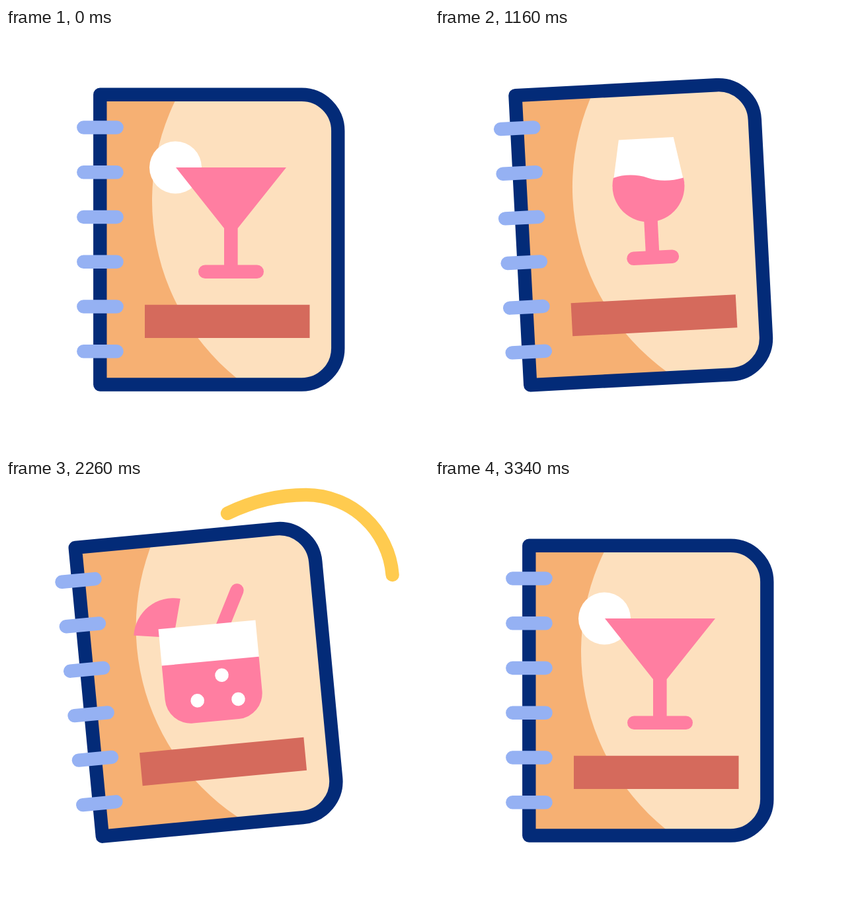
Recreate the animation shown at these times as an HTML page. Size 640 px wide and 640 px high, loop 3580 ms.

```html
<!DOCTYPE html>
<html lang="en">
<head>
<meta charset="utf-8">
<title>Drinks menu</title>
<style>
  html, body { margin: 0; width: 100%; height: 100%; overflow: hidden; background: #fff; }
  svg { display: block; width: 100vw; height: 100vh; }
  .pink { fill: #ff7ea1; }
  .white { fill: #fff; }
  .line { fill: none; stroke-width: 20.4; stroke-linecap: round; stroke-linejoin: round; }
  .arc { stroke: #ffcb4f; }
</style>
</head>
<body>
<svg viewBox="0 0 640 640">
  <defs>
    <path id="cover" d="M142.3 100.8H447A55 55 0 0 1 502.3 156V484A55 55 0 0 1 447 539.5H142.3Z"/>
    <clipPath id="inside"><use href="#cover"/></clipPath>
    <clipPath id="aboveBar"><rect width="640" height="444"/></clipPath>
  </defs>

  <path class="line arc" pathLength="1" d="M345 63.5C380 46 412 37 447 37C525 37 588 100 588 178Q588 189 587 200"/>
  <path class="line arc" pathLength="1" d="M583 182Q585 168 585 155C585 83 526 24 454 24C408 24 370 35 335 52"/>

  <g id="book">
    <g clip-path="url(#inside)">
      <use href="#cover" fill="#f6b073"/>
      <circle cx="566" cy="261.5" r="345" fill="#fde0be"/>
    </g>
    <use href="#cover" class="line" stroke="#032b78"/>
    <path id="rings" class="line" stroke="#95b1f3"/>

    <g clip-path="url(#aboveBar)">
      <g class="drink">
        <circle class="white" cx="256.5" cy="211" r="39.5"/>
        <path class="pink" d="M257 211H424L350.6 303V368H330V303Z"/>
        <rect class="pink" x="291" y="358.5" width="99" height="20.5" rx="10.2"/>
      </g>
      <g class="drink">
        <path class="white" d="M295 138H378L391 210H282Z"/>
        <path class="pink" d="M284 195C300 190 320 191 336 197.5C352 204 372 204.5 390 200A54.5 54.5 0 1 1 284 195Z"/>
        <path class="pink" d="M327 260H347.5V318H327Z"/>
        <rect class="pink" x="298" y="308" width="79" height="20.5" rx="10.2"/>
      </g>
      <g class="drink">
        <path class="line" stroke="#ff7ea1" d="M380 144L352 198"/>
        <path class="pink" d="M277.7 206.6L218 197.5A60 60 0 0 1 293.4 148.6Z"/>
        <path class="white" d="M256 191.5H403.5V248H256Z"/>
        <path class="pink" d="M256 247H403.5V299A39 39 0 0 1 364.5 338H295A39 39 0 0 1 256 299Z"/>
        <g class="white">
          <circle cx="345" cy="269.6" r="10.3"/>
          <circle cx="304.7" cy="304.6" r="10.3"/>
          <circle cx="366.5" cy="308" r="10.3"/>
        </g>
      </g>
    </g>
    <path fill="#d56a5c" d="M210 418.8H459.5V469H210Z"/>
  </g>
</svg>
<script>
const LOOP = 3580, START = 180, END = 3340, CYCLE = (END - START) / 3;
const SWAP = 457; // moment in a cycle when the next drink takes over
const REST = [0, 45, 45];
const TILT = [[180, 0], [360, -6], [760, 6], [855, 6], [1310, -6], [1750, 6],
              [2193, -6], [2688, 6], [3085, 0]];
const LIFT = [[0, 0], [270, -45], [SWAP, 280], [869, -20], [CYCLE, 0]];
const ARC_STARTS = [500, 1851];

const book = document.getElementById('book');
const drinks = document.querySelectorAll('.drink');
const arcs = document.querySelectorAll('.arc');

document.getElementById('rings').setAttribute('d',
  Array.from({ length: 6 }, (_, i) => `M117.3 ${150.5 + i * 67.75}h50.3`).join(''));

const ease = (t, from, to) => {
  const s = Math.min(1, Math.max(0, (t - from) / (to - from)));
  return s * s * (3 - 2 * s);
};

// Eased value at time t along a list of [time, value] keys
const track = (keys, t) => keys.slice(1).reduce((value, [time, next], i) =>
  value + (next - keys[i][1]) * ease(t, keys[i][0], time), keys[0][1]);

function draw(t) {
  book.setAttribute('transform', `rotate(${track(TILT, t)} 157 502)`);

  const run = Math.min(END, Math.max(START, t)) - START;
  const cycle = Math.min(2, Math.floor(run / CYCLE));
  const phase = run - cycle * CYCLE;
  const shown = (cycle + (phase >= SWAP)) % 3;
  const lift = track(LIFT, phase);
  drinks.forEach((drink, i) => {
    drink.style.display = i === shown ? '' : 'none';
    drink.setAttribute('transform', `translate(0 ${lift + REST[i]})`);
  });

  arcs.forEach((arc, i) => {
    const age = t - ARC_STARTS[i];
    const head = ease(age, 0, 300), tail = ease(age, 360, 610);
    arc.style.display = head > tail ? '' : 'none';
    arc.setAttribute('stroke-dasharray', `${head - tail} 2`);
    arc.setAttribute('stroke-dashoffset', -tail);
  });
}

const begin = performance.now();
function tick() {
  draw((performance.now() - begin) % LOOP);
  requestAnimationFrame(tick);
}
tick();
</script>
</body>
</html>
```
